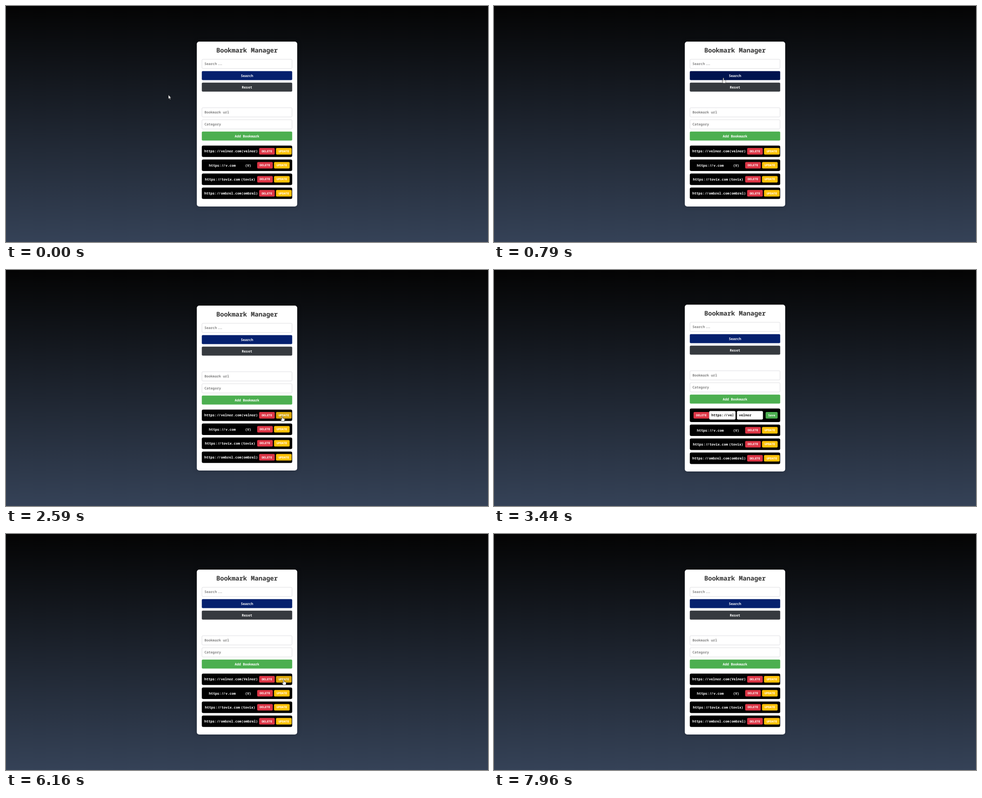
An HTML page for the animation above (8000 ms loop, 1000 by 492 pixels).

```html
<!DOCTYPE html>
<html lang="en">
<head>
<meta charset="utf-8">
<title>Bookmark Manager</title>
<style>
  html, body { margin: 0; height: 100%; overflow: hidden; }
  body { background: linear-gradient(#040404, #354257); }
  svg { display: block; }
  #stage { width: 100vw; height: 100vh; }
  text { font-family: "Noto Sans Mono", "DejaVu Sans Mono", monospace; font-weight: 600; text-rendering: geometricPrecision; }
  .card { filter: drop-shadow(0 0 5px rgba(0, 0, 0, .2)); }
</style>
</head>
<body>
<svg id="stage" viewBox="0 0 1000 492"></svg>
<script>
const LOOP = 8000;
const stage = document.getElementById('stage');

// Pointer path: [time, x, y]
const path = [
  [0, 337, 185.5], [30, 337, 185.5], [790, 476, 150], [910, 476, 150], [980, 478, 153],
  [1120, 478, 153], [1260, 490, 222], [1410, 490, 222], [2120, 562, 330], [2230, 562, 330],
  [2310, 571, 312], [2470, 573, 305], [2870, 573, 305], [3050, 535, 303], [5790, 535, 303],
  [6010, 576, 304], [6160, 576, 304], [6250, 582, 302], [6850, 582, 302], [7150, 540, 222],
  [7380, 540, 222], [7960, 500, 121], [LOOP, 500, 121]
];
const EDIT = 2670, FOCUS = 3840, ERASE = 4370, TYPE = 4960, SAVE = 6160;

// Column and row geometry shared by the card's parts
const LEFT = 406.25, WIDTH = 187.5, ROW = 23.96, PITCH = 29.17, FONT = 7.12;

const colors = {
  blue: ['#05206e', '#00134f'], gray: ['#363a3f', '#23272b'], green: ['#4caf50', '#45a049'],
  red: ['#dc3545', '#c82333'], yellow: ['#ffc107', '#dba60a']
};
const rows = [
  ['velnor', 411.5, 488.4, 525.2], ['v', 421, 496, 521.1],
  ['tovix', 412.8, 487.5, 521.1], ['ombrel', 411.5, 488.4, 525.2]
];

let pointer, shape;

function pointerAt(t) {
  const i = path.findIndex(p => p[0] > t);
  const [t0, x0, y0] = path[i - 1], [t1, x1, y1] = path[i];
  const k = (t - t0) / (t1 - t0), e = k * k * (3 - 2 * k);
  return [x0 + (x1 - x0) * e, y0 + (y1 - y0) * e];
}

const inside = (x, y, w, h) =>
  pointer[0] >= x && pointer[0] <= x + w && pointer[1] >= y && pointer[1] <= y + h;

const rect = (x, y, w, h, fill, r = 2, more = '') =>
  `<rect x="${x}" y="${y}" width="${w}" height="${h}" rx="${r}" fill="${fill}" ${more}/>`;

// Tightens slashes and dots the way a coding font's ligatures do
const ligate = s => s
  .replace(/\/\/./, '<tspan dx=".5 -1 .5">$&</tspan>')
  .replace('...', '<tspan dx="1.5 -1.3 -1.2">...</tspan>');

const text = (x, y, s, fill = '#fff', size = FONT, anchor = 'start') =>
  `<text x="${x}" y="${y}" fill="${fill}" font-size="${size}" text-anchor="${anchor}">${ligate(s)}</text>`;

function button(x, y, w, h, label, color, size) {
  const over = inside(x, y, w, h);
  if (over) shape = 'hand';
  return rect(x, y, w, h, colors[color][+over]) +
    text(x + w / 2, y + h / 2 + size * .36, label, '#fff', size, 'middle');
}

const wide = (y, label, color) => button(LEFT, y, WIDTH, 18.75, label, color, FONT);
const small = (x, y, w, label, color) => button(x, y, w, 13.54, label, color, 6.1);

function field(x, y, w, h, content, stroke = '#fff') {
  if (inside(x, y, w, h)) shape = 'none';
  return rect(x + .3, y + .3, w - .6, h - .6, '#fff', 2, `stroke="${stroke}" stroke-width=".6"`) + content;
}

const input = (y, hint) =>
  field(LEFT, y, WIDTH, 19.8, text(411.8, y + 12.5, hint, '#828282'), '#c8c8ce');

function row([name, urlX, tagX, btnX], y, tag) {
  return rect(LEFT, y, WIDTH, ROW, '#000', 3) +
    text(urlX, y + 14.5, `https://${name}.com`) + text(tagX, y + 14.5, `(${tag})`) +
    small(btnX, y + 5.2, 32.4, 'DELETE', 'red') + small(btnX + 35, y + 5.2, 32.4, 'UPDATE', 'yellow');
}

function editRow(t) {
  const focused = t >= FOCUS;
  const tag = t < ERASE ? 'velnor' : t < TYPE ? 'elnor' : 'Velnor';
  const since = t - (t < ERASE ? FOCUS : t < TYPE ? ERASE : TYPE);
  const caretOn = focused && since % 1050 < 525;
  const caretX = tag.length > 5 ? 512.7 : 508.3;
  return rect(LEFT, 288.8, WIDTH, 28.1, '#000', 3) +
    small(414, 296.1, 32.4, 'DELETE', 'red') +
    field(446.4, 294, 54.7, 17.7,
      `<svg x="451" y="290" width="45.5" height="24">${text(0, 15.4, 'https://velnor.com', '#111')}</svg>`) +
    (focused ? rect(503, 293.3, 56, 19.1, '#000', 3, 'stroke="#fff"') : '') +
    field(504, 294, 54, 17.7, text(508.3, 305.4, tag, '#111')) +
    (focused ? rect(504.3, 294.5, 53.4, 16.7, 'none', 2, 'stroke="#111"') : '') +
    (caretOn ? rect(caretX - .3, 299, .6, 8, '#000', 0) : '') +
    small(563.5, 296.1, 25, 'Save', 'green');
}

function cursor() {
  const arrow = 'M0 0V8.2L1.9 6.5L3.2 9.4L4.5 8.8L3.2 6H5.7Z';
  const hand = 'M-.9 .2Q0-.9 .9 .2V4L4.6 5Q5.4 5.4 5.3 6.5L4.4 10.7H-.5L-3.2 7Q-3.6 5.8-2.3 5.9L-.9 7.2Z';
  if (shape === 'none') return '';
  return `<path transform="translate(${pointer})" d="${shape === 'hand' ? hand : arrow}"
    fill="#fff" stroke="#222" stroke-width=".6" stroke-linejoin="round"/>`;
}

function scene(t) {
  pointer = pointerAt(t);
  shape = 'arrow';
  const editing = t >= EDIT && t < SAVE;
  const d = editing ? 2.08 : 0;
  const tag = t < SAVE ? 'velnor' : 'Velnor';
  return rect(395.85, 74.25 - d, 208.3, 343.75 + 2 * d, '#fff', 5, 'class="card"') +
    text(500, 97.3 - d, 'Bookmark Manager', '#333', 13.3, 'middle') +
    input(110.8 - d, 'Search...') +
    wide(135.8 - d, 'Search', 'blue') +
    wide(159.8 - d, 'Reset', 'gray') +
    input(211.8 - d, 'Bookmark url') +
    input(236.8 - d, 'Category') +
    wide(261.8 - d, 'Add Bookmark', 'green') +
    (editing ? editRow(t) : row(rows[0], 290.9, tag)) +
    rows.slice(1).map((r, i) =>
      row(r, 290.9 + (i + 1) * PITCH + d, r[0] === 'v' ? 'V' : r[0])).join('') +
    cursor();
}

function frame(now) {
  stage.innerHTML = scene(now % LOOP);
  requestAnimationFrame(frame);
}
requestAnimationFrame(frame);
</script>
</body>
</html>
```
